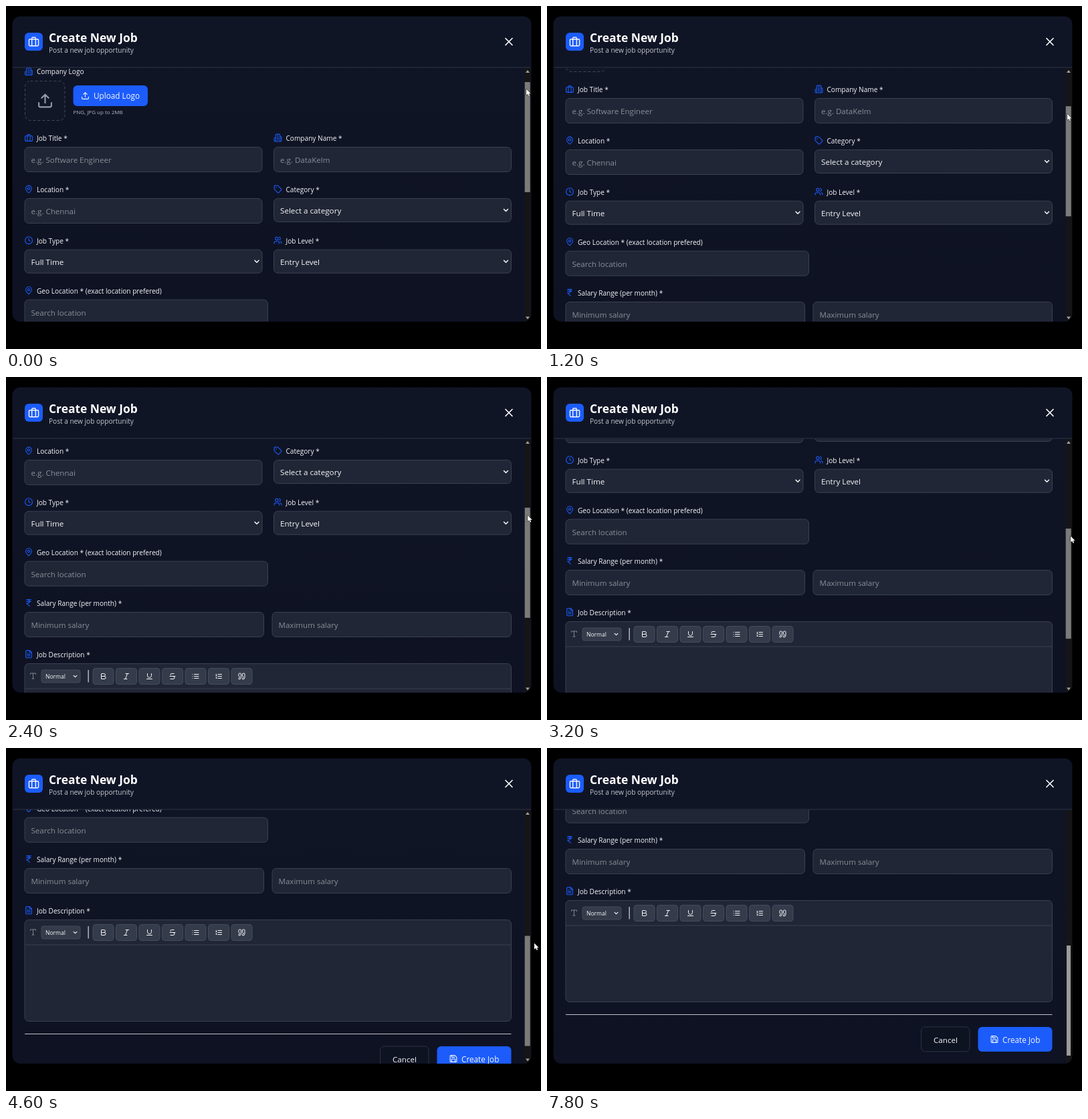
Write an HTML page with a canvas that moves like this. It is 800 px wide and 514 px high and loops after 8 s.

```html
<!DOCTYPE html>
<html lang="en">
<head>
<meta charset="utf-8">
<title>Create New Job</title>
<style>
html, body { margin: 0; width: 100%; height: 100%; overflow: hidden; background: #000; }
canvas { display: block; width: 800px; height: 514px; }
</style>
</head>
<body>
<canvas id="stage"></canvas>
<script>
const W = 800, H = 514, LOOP = 8000, STEP = 200;
const canvas = document.getElementById('stage');
const ctx = canvas.getContext('2d');
const dpr = window.devicePixelRatio || 1;
canvas.width = W * dpr;
canvas.height = H * dpr;

const FONT = '"Open Sans", "Noto Sans", sans-serif';
const BLUE = '#1b5cfb', WHITE = '#f6f7f9', MUTED = '#8a8e99';
const FIELD = '#212636', EDGE = '#3b4151';

// Icons on a 24 unit grid
const circle = (x, y, r) => `M${x - r} ${y}a${r} ${r} 0 1 0 ${2 * r} 0a${r} ${r} 0 1 0 ${-2 * r} 0`;
const quoteMark = x => `M${x} 3a2 2 0 0 0-2 2v6a2 2 0 0 0 2 2 1 1 0 0 1 1 1v1a2 2 0 0 1-2 2 1 1 0 0 0-1 1v2a1 1 0 0 0 1 1 6 6 0 0 0 6-6V5a2 2 0 0 0-2-2z`;
const shapes = {
  briefcase: 'M4 7h16a2 2 0 0 1 2 2v10a2 2 0 0 1-2 2H4a2 2 0 0 1-2-2V9a2 2 0 0 1 2-2zM16 21V5a2 2 0 0 0-2-2h-4a2 2 0 0 0-2 2v16',
  building: 'M6 22V4a2 2 0 0 1 2-2h8a2 2 0 0 1 2 2v18ZM6 12H4a2 2 0 0 0-2 2v6a2 2 0 0 0 2 2h2M18 9h2a2 2 0 0 1 2 2v9a2 2 0 0 1-2 2h-2M10 6h4M10 10h4M10 14h4M10 18h4',
  upload: 'M21 15v4a2 2 0 0 1-2 2H5a2 2 0 0 1-2-2v-4M17 8l-5-5-5 5M12 3v12',
  pin: 'M20 10c0 5-5.5 10.2-7.4 11.8a1 1 0 0 1-1.2 0C9.5 20.2 4 15 4 10a8 8 0 0 1 16 0z' + circle(12, 10, 3),
  tag: 'M12.6 2.6A2 2 0 0 0 11.2 2H4a2 2 0 0 0-2 2v7.2a2 2 0 0 0 .6 1.4l8.7 8.7a2.4 2.4 0 0 0 3.4 0l6.6-6.6a2.4 2.4 0 0 0 0-3.4z' + circle(7.5, 7.5, 0.5),
  clock: circle(12, 12, 10) + 'M12 6v6l4 2',
  users: 'M16 21v-2a4 4 0 0 0-4-4H6a4 4 0 0 0-4 4v2M22 21v-2a4 4 0 0 0-3-3.9M16 3.1a4 4 0 0 1 0 7.8' + circle(9, 7, 4),
  rupee: 'M6 3h12M6 8h12M6 13l8.5 8M6 13h3c6.7 0 6.7-10 0-10',
  file: 'M15 2H6a2 2 0 0 0-2 2v16a2 2 0 0 0 2 2h12a2 2 0 0 0 2-2V7ZM14 2v4a2 2 0 0 0 2 2h4M10 9H8M16 13H8M16 17H8',
  type: 'M4 7V4h16v3M9 20h6M12 4v16',
  bold: 'M6 12h9a4 4 0 0 1 0 8H7a1 1 0 0 1-1-1V5a1 1 0 0 1 1-1h7a4 4 0 0 1 0 8',
  italic: 'M19 4h-9M14 20H5M15 4 9 20',
  underline: 'M6 4v6a6 6 0 0 0 12 0V4M4 20h16',
  strike: 'M16 4H9a3 3 0 0 0-2.8 4M14 12a4 4 0 0 1 0 8H6M4 12h16',
  list: 'M3 6h.01M3 12h.01M3 18h.01M8 6h13M8 12h13M8 18h13',
  ordered: 'M10 6h11M10 12h11M10 18h11M4 10h2M4 6h1v4M6 18H4c0-1 2-2 2-3s-1-1.5-2-1',
  quote: quoteMark(16) + quoteMark(5),
  save: 'M15.2 3a2 2 0 0 1 1.4.6l3.8 3.8a2 2 0 0 1 .6 1.4V19a2 2 0 0 1-2 2H5a2 2 0 0 1-2-2V5a2 2 0 0 1 2-2zM17 21v-7a1 1 0 0 0-1-1H8a1 1 0 0 0-1 1v7M7 3v4a1 1 0 0 0 1 1h7',
  close: 'M18 6 6 18M6 6l12 12',
  chevron: 'M6 9l6 6 6-6'
};
const icons = {};
for (const name in shapes) icons[name] = new Path2D(shapes[name]);
const arrow = new Path2D('M0 0V9.2L2.2 7.2 3.7 10.4 5.2 9.7 3.8 6.7H6.6Z');

function icon(name, cx, cy, size, color, weight = 2) {
  ctx.save();
  ctx.translate(cx - size / 2, cy - size / 2);
  ctx.scale(size / 24, size / 24);
  ctx.lineWidth = weight;
  ctx.lineCap = ctx.lineJoin = 'round';
  ctx.strokeStyle = color;
  ctx.stroke(icons[name]);
  ctx.restore();
}

function text(str, x, y, size, color = WHITE, weight = 400) {
  ctx.font = `${weight} ${size}px ${FONT}`;
  ctx.fillStyle = color;
  ctx.fillText(str, x, y);
}

function box(x, y, w, h, r, fill, stroke) {
  ctx.beginPath();
  ctx.roundRect(x, y, w, h, r);
  if (fill) { ctx.fillStyle = fill; ctx.fill(); }
  if (stroke) { ctx.strokeStyle = stroke; ctx.lineWidth = 1; ctx.stroke(); }
}

function rect(x, y, w, h, color) {
  ctx.fillStyle = color;
  ctx.fillRect(x, y, w, h);
}

function label(name, str, x, y) {
  icon(name, x + 6, y - 0.5, 13, BLUE);
  text(str, x + 18, y + 3.9, 10.1);
}

function input(hint, x, y, w) {
  box(x, y + 13.5, w, 37, 6, FIELD, EDGE);
  text(hint, x + 9.5, y + 37, 11.55, MUTED);
}

function select(value, x, y, w) {
  box(x, y + 13.5, w, 35, 6, FIELD, EDGE);
  text(value, x + 9.5, y + 36, 11.65);
  icon('chevron', x + w - 8, y + 31, 12, WHITE, 3);
}

function logoPicker() {
  label('building', 'Company Logo', 28, 98.5);
  ctx.setLineDash([4, 3]);
  box(28.5, 112.5, 59.5, 59, 8, '#121728', '#424858');
  ctx.setLineDash([]);
  icon('upload', 58.5, 142, 25, '#969ba7');
  box(100.5, 119, 111.5, 31, 6, BLUE);
  icon('upload', 118.5, 134.5, 13, WHITE);
  text('Upload Logo', 131, 139.3, 11.7);
  text('PNG, JPG up to 2MB', 100.5, 162.2, 8, '#b3b7c0');
}

function editor() {
  box(28, 593.5, 727.5, 152, 6, FIELD, EDGE);
  rect(28, 630.5, 727, 1, EDGE);
  icon('type', 40.5, 612, 12, '#7c818d');
  box(53, 603, 58, 19, 3, '#353b4a', '#444a59');
  text('Normal', 59, 616.2, 8.55);
  icon('chevron', 103.5, 612.5, 9.5, WHITE, 3);
  rect(122.5, 603, 1.3, 18.5, '#c8cbd2');
  ['bold', 'italic', 'underline', 'strike', 'list', 'ordered', 'quote'].forEach((name, i) => {
    const x = 130 + i * 34.5;
    box(x, 600.5, 31, 24, 4, '#343b4a', '#454c5b');
    icon(name, x + 15.5, 612.5, 12, WHITE);
  });
}

function form() {
  logoPicker();
  const L = 28, R = 400.5, HALF = 355;
  label('briefcase', 'Job Title *', L, 198);
  input('e.g. Software Engineer', L, 198, HALF);
  label('building', 'Company Name *', R, 198);
  input('e.g. DataKelm', R, 198, HALF);

  label('pin', 'Location *', L, 275);
  input('e.g. Chennai', L, 275, HALF);
  label('tag', 'Category *', R, 275);
  select('Select a category', R, 275, HALF);

  label('clock', 'Job Type *', L, 351.7);
  select('Full Time', L, 351.7, HALF);
  label('users', 'Job Level *', R, 351.7);
  select('Entry Level', R, 351.7, HALF);

  label('pin', 'Geo Location * (exact location prefered)', L, 426.7);
  input('Search location', L, 426.7, 363.5);

  label('rupee', 'Salary Range (per month) *', L, 503);
  input('Minimum salary', L, 503, 357.5);
  input('Maximum salary', 398, 503, 357.5);

  label('file', 'Job Description *', L, 579.8);
  editor();

  rect(28, 764, 727.5, 1, '#bfc2c9');
  box(559.5, 783, 72.5, 37, 6, '#0e1322', '#2c3242');
  text('Cancel', 578, 807, 11.65);
  box(644.5, 783, 111, 37, 6, BLUE);
  icon('save', 669, 801.5, 13, WHITE);
  text('Create Job', 681, 807, 11.75);
}

function header() {
  box(28, 40, 27, 27, 6, BLUE);
  icon('briefcase', 41.5, 53.3, 17, WHITE);
  text('Create New Job', 64, 53.8, 17.4, '#fff', 700);
  text('Post a new job opportunity', 64, 70, 10.1, '#c3c6ce');
  icon('close', 752, 53.5, 20, '#fff');
  rect(10, 91.5, 775, 1, '#303646');
}

function triangle(x, y, dir) {
  ctx.beginPath();
  ctx.moveTo(x - 3, y + 2 * dir);
  ctx.lineTo(x + 3, y + 2 * dir);
  ctx.lineTo(x, y - 2 * dir);
  ctx.fillStyle = '#a0a0a0';
  ctx.fill();
}

function scrollbar(scroll, t) {
  const wide = t < 7000;
  rect(775, 93, 10, 380, '#151518');
  if (wide) {
    triangle(780, 98, 1);
    triangle(780, 467.5, -1);
  }
  const y = 114 + scroll * 0.4986;
  rect(wide ? 775.7 : 777, y, wide ? 8 : 6, 165, t < 6000 ? '#7b7b7b' : '#9a9a9a');
}

// Linear interpolation through [time, ...values] keys
function track(keys, t) {
  let i = 1;
  while (i < keys.length - 1 && keys[i][0] < t) i++;
  const a = keys[i - 1], b = keys[i];
  const p = Math.min(1, Math.max(0, (t - a[0]) / (b[0] - a[0])));
  return a.slice(1).map((v, k) => v + (b[k + 1] - v) * p);
}

const scrollKeys = [[0, 0], [200, 8], [800, 43], [1800, 117], [3200, 227], [4600, 336], [5000, 365]];
const pointerKeys = [
  [0, 778, 124.5], [800, 778, 147], [1800, 778, 184], [3200, 783, 238.5], [4600, 790, 292.5],
  [5000, 795, 309], [5600, 793, 307], [6000, 780, 295], [6200, 772, 287],
  [6400, 775, 230], [6600, 782, 130], [6800, 792, 11]
];

function pointer(t) {
  if (t >= 7000) return;
  const [x, y] = track(pointerKeys, t);
  ctx.save();
  ctx.translate(x, y);
  ctx.lineWidth = 1;
  ctx.strokeStyle = '#000';
  ctx.stroke(arrow);
  ctx.fillStyle = '#fff';
  ctx.fill(arrow);
  ctx.restore();
}

const panel = ctx.createLinearGradient(0, 15, 0, 473);
panel.addColorStop(0, '#101526');
panel.addColorStop(1, '#0e1223');

function draw(t) {
  ctx.setTransform(dpr, 0, 0, dpr, 0, 0);
  rect(0, 0, W, H, '#000');
  const [scroll] = track(scrollKeys, t);

  ctx.save();
  box(9.5, 15.5, 776, 457.5, 12, panel);
  ctx.clip();
  header();
  ctx.save();
  ctx.beginPath();
  ctx.rect(9, 92.5, 766, 381);
  ctx.clip();
  ctx.translate(0, -Math.round(scroll));
  form();
  ctx.restore();
  scrollbar(scroll, t);
  ctx.restore();

  pointer(t);
}

const start = performance.now();
function frame() {
  const t = (performance.now() - start) % LOOP;
  draw(Math.floor(t / STEP) * STEP);
  requestAnimationFrame(frame);
}
frame();
</script>
</body>
</html>
```
